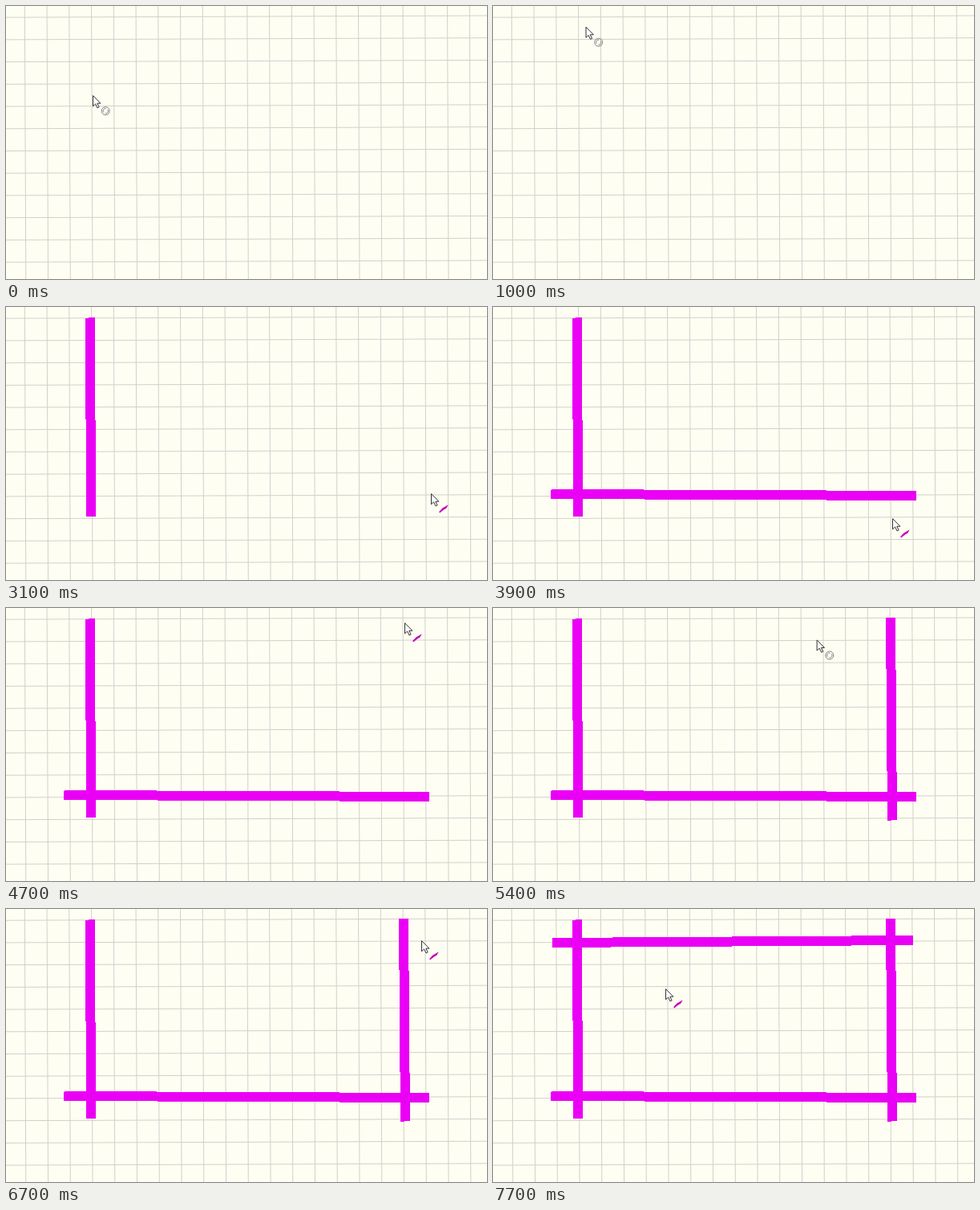
An HTML page that plays this animation: 600x340 px, repeating every 8000 ms.

```html
<!DOCTYPE html>
<html lang="en">
<head>
<meta charset="utf-8">
<title>Drawing a frame on grid paper</title>
<style>
  html, body { margin: 0; width: 100%; height: 100%; overflow: hidden; background: #fefef3; }
  svg { display: block; width: 100vw; height: 100vh; }
</style>
</head>
<body>
<svg id="stage" viewBox="0 0 600 340">
  <rect width="600" height="340" fill="#fefef3"/>
  <path id="grid" fill="none" stroke="#d1d1cc"/>
  <g id="bars" stroke="#ea00f5" stroke-width="12" shape-rendering="crispEdges"></g>
  <g id="cursor">
    <path d="M-.5 -.4V12.8L2.6 9.9 5 14.9 7.1 13.9 4.8 9.2H8.9Z" fill="#fff" stroke="#333"/>
    <path id="pen" d="M9 22.2L13.4 17.5 20.8 13.3 18.2 17.8 15.4 19.3 10.3 23.2Z" fill="#c400bd"/>
    <g id="ring" fill="none" stroke="#777" stroke-width=".9">
      <circle cx="15.2" cy="18.7" r="5"/>
      <path d="M12.7 20.5A3 3 0 0 1 15.6 15.7M17.8 16.9A3 3 0 0 1 14.9 21.7"/>
    </g>
  </g>
</svg>
<script>
const LOOP = 8000, STEP = 100;
const el = id => document.getElementById(id);

// Pointer moves; bow bends the way sideways
const home = [109, 112];
const moves = [
  { start: 200, end: 400, to: [98, 69] },
  { start: 500, end: 1300, to: [106, 13], bow: 20 },
  { start: 1400, end: 1900, to: [107, 262], bow: 16 },
  { start: 2100, end: 2400, to: [73, 233] },
  { start: 2400, end: 3100, to: [531, 233] },
  { start: 3400, end: 3700, to: [499, 264] },
  { start: 3900, end: 4900, to: [496, 11], bow: 19 },
  { start: 5100, end: 5900, to: [80, 190], bow: 15 },
  { start: 5900, end: 6100, to: [74, 42] },
  { start: 6100, end: 6700, to: [519, 40] },
  { start: 7000, end: 7700, to: [216, 100], bow: -125 }
];

// Finished strokes: time of appearance and end points
const strokes = [
  { at: 2200, from: [105, 13.5], to: [106, 261] },
  { at: 3900, from: [72.5, 233], to: [528, 235] },
  { at: 5100, from: [496, 12], to: [498, 264.5] },
  { at: 7100, from: [74, 42], to: [524, 39] }
];
const hovers = t => t < 1300 || (t >= 5200 && t < 6100);

let grid = "";
for (let k = 0; k < 21; k++) {
  grid += `M${23.3 + 27.75 * k} 0l1.5 340`;
  if (k < 12) grid += `M0 ${14.2 + 27.72 * k}l600 -2.2`;
}
el("grid").setAttribute("d", grid);

for (const s of strokes) {
  s.node = document.createElementNS("http://www.w3.org/2000/svg", "path");
  s.node.setAttribute("d", `M${s.from}L${s.to}`);
  el("bars").append(s.node);
}

const ease = u => u < .5 ? 4 * u ** 3 : 1 - 4 * (1 - u) ** 3;

function tipAt(t) {
  let [x, y] = home;
  for (const { start, end, to, bow = 0 } of moves) {
    if (t < start) break;
    const e = ease(Math.min(1, (t - start) / (end - start)));
    const dx = to[0] - x, dy = to[1] - y;
    const side = bow * Math.sin(Math.PI * e) / Math.hypot(dx, dy);
    x += dx * e - dy * side;
    y += dy * e + dx * side;
  }
  return [x, y];
}

function show(node, on) {
  node.setAttribute("visibility", on ? "visible" : "hidden");
}

function draw(t) {
  const [x, y] = tipAt(t);
  el("cursor").setAttribute("transform", `translate(${x} ${y})`);
  show(el("ring"), hovers(t));
  show(el("pen"), !hovers(t));
  for (const s of strokes) show(s.node, t >= s.at);
}

const start = performance.now();
function frame() {
  const t = (performance.now() - start) % LOOP;
  draw(Math.floor(t / STEP) * STEP);
  requestAnimationFrame(frame);
}
frame();
</script>
</body>
</html>
```
